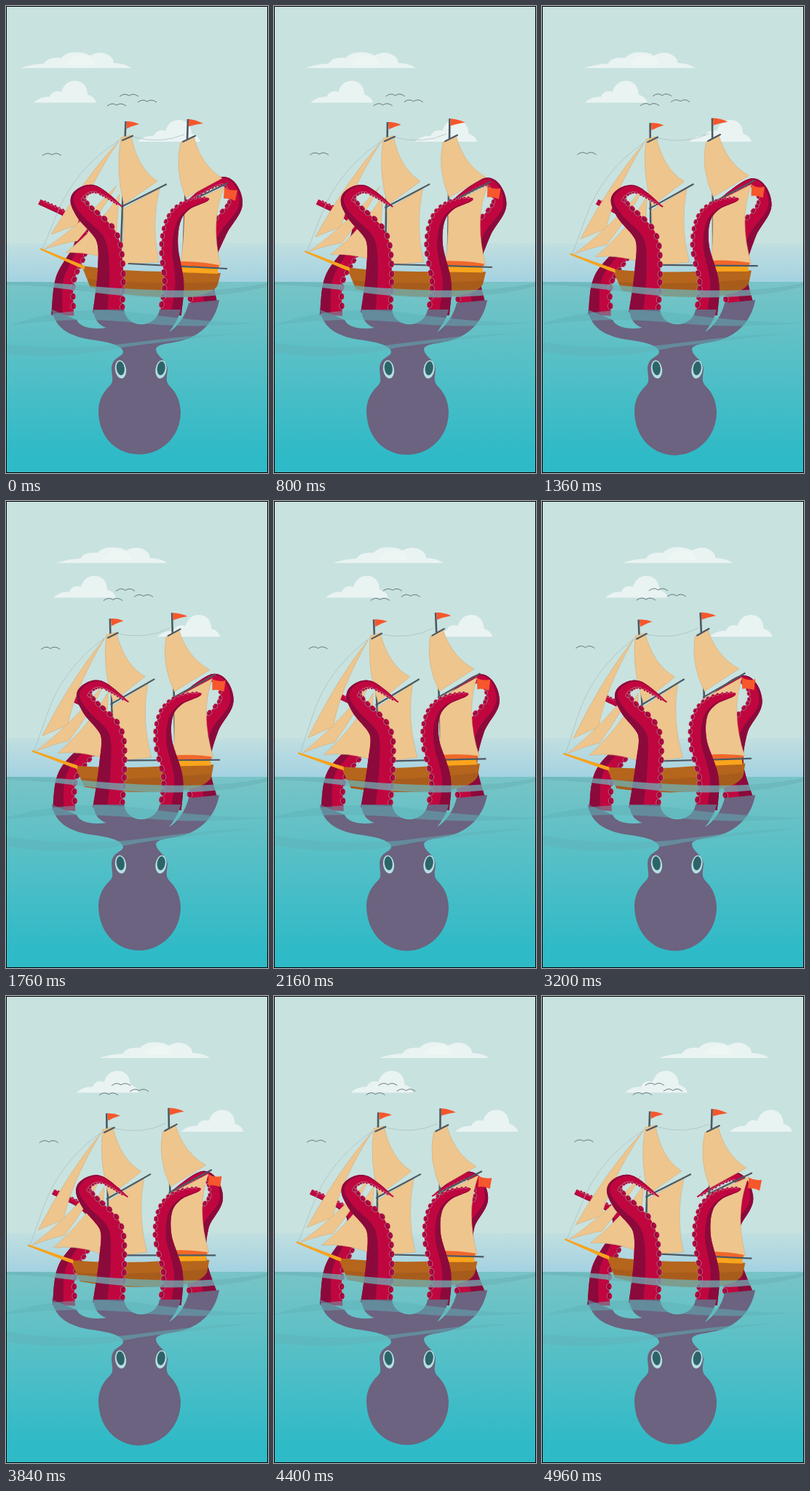
Animation of 360 by 640 pixels, one loop 5.04 s. Source, as an HTML page:

```html
<!DOCTYPE html>
<html lang="en">
<head>
<meta charset="utf-8">
<title>Octopus and ship</title>
<style>
html, body { margin: 0; width: 100%; height: 100%; overflow: hidden; background: #c8e2df; }
svg { display: block; width: 360px; height: 640px; }
</style>
</head>
<body>
<svg viewBox="0 0 360 640" width="360" height="640">
  <defs>
    <linearGradient id="haze" x1="0" y1="0" x2="0" y2="1">
      <stop offset="0" stop-color="#c1dfe0"/><stop offset="1" stop-color="#a2d1e1"/>
    </linearGradient>
    <linearGradient id="sea" x1="0" y1="0" x2="0" y2="1">
      <stop offset="0" stop-color="#78c4c6"/><stop offset=".9" stop-color="#2fbac7"/>
    </linearGradient>
    <path id="puff" d="M0,30 Q9,21 22,22 Q26,12 38,15 Q43,0 57,0 Q73,1 74,19 Q84,22 86,30Z"/>
    <path id="bird" d="M-13,2 Q-6,-3.5 0,1 Q6,-3.5 13,2"/>
    <g id="eye">
      <ellipse rx="7.5" ry="12.5" fill="#b5dfe2"/>
      <ellipse cy="-1.5" rx="5.5" ry="9.5" fill="#2c646a"/>
    </g>
  </defs>

  <rect width="360" height="640" fill="#c8e2df"/>
  <rect y="325" width="360" height="56" fill="url(#haze)"/>

  <g fill="#e9f3f2">
    <g id="cloudA">
      <path d="M20,85 Q38,79 52,79 Q58,69 76,71 Q84,62 100,63.5 Q111,64 115,68 Q130,60 142,68 Q148,72 148,78 Q165,79 172,85Z"/>
      <path d="M82,81 Q92,63 114,69 Q120,72 122,81Z" fill="#f2f8f7" opacity=".6"/>
    </g>
    <use id="cloudB" href="#puff"/>
    <use id="cloudC" href="#puff"/>
  </g>
  <g fill="none" stroke="#5d6d70" stroke-width=".9">
    <g id="flock">
      <use href="#bird" x="169" y="122"/><use href="#bird" x="152" y="135"/><use href="#bird" x="194" y="130"/>
    </g>
    <use id="loner" href="#bird" x="63" y="203"/>
  </g>

  <rect y="378" width="360" height="262" fill="url(#sea)"/>
  <g id="backArms"></g>

  <g id="ship">
    <g fill="none" stroke="#aabcbd" stroke-width=".7">
      <path d="M157,183 Q95,222 70,285 L50,333"/>
      <path d="M173,179 Q212,190 245,176"/>
    </g>
    <path d="M164.5,158 L157,355 M250,155 L243,355" stroke="#4c5963" stroke-width="2.6"/>
    <g fill="#eec58d" stroke="#cfa877" stroke-width=".5">
      <path d="M155,185 Q108,235 62,313 L98,300 Q111,250 155,185Z"/>
      <path d="M53,333 Q102,300 152,246 Q130,285 98,322 Q78,325 53,333Z"/>
      <path d="M82,338 Q128,302 156,258 Q150,310 152,352 Q118,336 82,338Z"/>
      <path d="M158,180 L172,177 Q180,222 208,240 L162,272 Q150,225 158,180Z"/>
      <path d="M161,278 L211,250 Q199,300 210,351 L158,354 Q163,312 161,278Z"/>
      <path d="M240,187 L258,178 Q267,217 297,236 L247,263 Q231,225 240,187Z"/>
      <path d="M245,273 L300,248 Q280,295 295,356 L240,354 Q246,310 245,273Z"/>
    </g>
    <path d="M160,184 L174,178 M243,186 L260,178 M159,275 L220,244.5 M245,271 L304,243" stroke="#4c5963" stroke-width="2.2" stroke-linecap="round"/>
    <g fill="#f6572c">
      <path d="M165.5,158 Q175,158 183,162 Q174,164 166,168Z"/>
      <path d="M251,155 Q262,156 271,161 Q261,162 251,165Z"/>
      <path d="M300,249 Q309,254 318,252 L315,267 Q307,263 299,264Z"/>
    </g>
    <path d="M104,356 Q165,365 238,364 L295,366 L291,382 Q280,399 235,399 Q170,399 116,386Z" fill="#b5651c"/>
    <path d="M112,374 Q190,382 291,378 L290,384 Q280,399 235,399 Q170,399 116,386Z" fill="#a85c1c"/>
    <path d="M238,355 L291,358 L291,367 L238,365Z" fill="#fba41c"/>
    <path d="M240,350 Q268,350 293,355 L292,359 L239,356Z" fill="#f1672a"/>
    <path d="M168,353 L304,360" stroke="#4c5963" stroke-width="2.2"/>
    <path d="M47,331.5 L108,356 L108,361 L100,358 L47,334Z" fill="#f6a31f"/>
  </g>

  <g id="frontArms"></g>
  <path id="body" fill="#6b637f"/>
  <use href="#eye" transform="translate(157.5 498) rotate(-8)"/>
  <use href="#eye" transform="translate(213 498) rotate(8)"/>

  <path d="M0,378 C60,377 100,383 160,387 C240,392 310,391 360,379 L360,384 C310,398 240,403 160,397 C100,391 60,383 0,382Z" fill="#6cb6ba" opacity=".72"/>
  <g fill="#5fb3b9" opacity=".5">
    <path id="waveB" d="M5,438 C70,414 130,414 180,420 C240,430 300,434 345,434 C290,440 230,440 180,434 C120,428 70,429 5,438Z"/>
    <path id="waveC" d="M-60,452 C20,472 110,470 160,463 C210,457 260,450 315,449 C260,456 200,462 160,468 C110,479 30,488 -60,466Z"/>
  </g>
  <rect x=".5" y=".5" width="359" height="639" fill="none" stroke="#000"/>
</svg>

<script>
const LOOP = 5040, STEP = 80;
const RED = "#c0063f", DARK = "#8b0a3b";
const el = id => document.getElementById(id);
const clamp = (v, lo = 0, hi = 1) => Math.max(lo, Math.min(hi, v));
const smooth = v => { v = clamp(v); return v * v * (3 - 2 * v); };

// the ship rocks slowly over, then steadily back
const PEAK = 2.72;
const sway = t => 1.03 * (t < PEAK ? (t / PEAK) ** 1.25 : (5.04 - t) / (5.04 - PEAK));
const reach = t => 45 * Math.max(0, Math.sin(Math.PI * t / 4.8)) ** 1.8;
const lean = t => -13 * Math.sin(Math.PI * t / 5.8);

// path: key points from root to tip; side: where the suckers sit
const arms = {
  backLeft: { side: 1, root: 17, taper: .75, tip: 4, path: [[79, 424], [82, 375], [103, 330], [98, 296], [46, 268]] },
  frontLeft: { side: 1, root: 22, taper: .8, tip: 1, path: [[141, 422], [145, 362], [139, 316], [108, 282], [99, 262], [122, 251], [160, 275]] },
  frontRight: { side: -1, root: 16, taper: .5, tip: 1, path: [[225, 422], [230, 380], [224, 330], [230, 293], [248, 273], [279, 264]] },
  backRight: { side: -1, root: 20, taper: .75, tip: 1, path: [[271, 412], [267, 360], [290, 308], [315, 270], [298, 240], [248, 268]] }
};

// Catmull-Rom spline through the key points
function spline(pts) {
  const n = pts.length - 1, total = n * 12;
  return Array.from({ length: total + 1 }, (_, s) => {
    const i = Math.min(n - 1, Math.floor(s / 12)), u = s / 12 - i;
    const [a, b, c, d] = [-1, 0, 1, 2].map(k => pts[clamp(i + k, 0, n)]);
    return [0, 1].map(k => b[k] + .5 * u * (c[k] - a[k] + u * (2 * a[k] - 5 * b[k] + 4 * c[k] - d[k] + u * (3 * (b[k] - c[k]) + d[k] - a[k]))));
  });
}

const poly = (pts, fill) =>
  `<path d="M${pts.map(p => p.map(v => v.toFixed(1))).join("L")}Z" fill="${fill}"/>`;

function drawArm({ path, side, root, taper, tip }, move) {
  const line = spline(path.map(p => move(...p)));
  const last = line.length - 1;
  const width = line.map((_, i) => Math.max(tip, root * (1 - i / last) ** taper));
  const angle = line.map((_, i) => {
    const a = line[Math.max(0, i - 1)], b = line[Math.min(last, i + 1)];
    return Math.atan2(b[1] - a[1], b[0] - a[0]);
  });
  // point across the arm: k = 1 on the sucker edge, -1 on the back
  const at = (i, k) => {
    const off = width[i] * k * side;
    return [line[i][0] - Math.sin(angle[i]) * off, line[i][1] + Math.cos(angle[i]) * off];
  };
  const edge = k => line.map((_, i) => at(i, k(i / last)));
  const back = edge(() => -1);
  let svg = poly([...back, ...edge(() => .85).reverse()], RED) +
    poly([...back, ...edge(u => -.1 - .7 * smooth(u)).reverse()], DARK);

  let gap = 0;
  for (let i = 1; i < last - 1; i++) {
    gap += Math.hypot(line[i][0] - line[i - 1][0], line[i][1] - line[i - 1][1]);
    const r = clamp(width[i] * .3, 1.6, 4.2);
    if (gap < r * 2.4) continue;
    gap = 0;
    const [x, y] = at(i, .85);
    svg += `<g transform="translate(${x.toFixed(1)} ${y.toFixed(1)}) rotate(${(angle[i] * 180 / Math.PI).toFixed(1)})">` +
      `<ellipse rx="${r * 1.1}" ry="${r * .85}" fill="${DARK}" stroke="#e3a9ae" stroke-width=".5"/>` +
      `<ellipse cy="${side * r * .2}" rx="${r * .65}" ry="${r * .4}" fill="${RED}"/></g>`;
  }
  return svg;
}

const bodyPath = bottom => `M63,416 C67,440 85,452 115,457 C140,460 160,465 161,474 C160,482 146,480 145,497
  C146,512 148,514 143,520 C130,532 127,545 127,556 C128,595 155,${bottom} 183,${bottom} C212,${bottom} 240,592 240,556
  C239,540 234,530 224,520 C219,514 221,508 222,498 C221,483 207,482 206,470 C208,463 222,463 240,459
  C270,452 288,430 293,403 L251,407 C247,425 235,440 224,447 C229,440 237,430 240,416 L211,416
  C207,442 166,444 162,416 L120,416 C121,430 128,438 138,441 C118,444 101,440 97,430Z`;

const place = (id, x, y = 0, more = "") =>
  el(id).setAttribute("transform", `translate(${x.toFixed(2)} ${y.toFixed(2)}) ${more}`);

function render(ms) {
  const t = ms / 1000, r = sway(t), pull = reach(t), tilt = lean(t);
  place("cloudA", 28.2 * t);
  place("cloudB", 38 + 15.3 * t, 102.5);
  place("cloudC", 181 + 15.5 * t, 156);
  place("flock", -2.85 * t, -.3 * t);
  place("loner", -1.1 * t, -t);
  place("waveB", -32 * r, 0, `scale(${1 + .18 * r} 1)`);
  place("waveC", 42 * r);
  place("ship", -3.1 * t, 0, `rotate(${-5.6 * r} 212 435)`);

  // arms bend more the higher they rise above the water
  const rise = (y, span) => smooth((405 - y) / span);
  el("backArms").innerHTML =
    drawArm(arms.backLeft, (x, y) => [x + 3 * r + pull * rise(y, 135) ** 1.4, y]) +
    drawArm(arms.backRight, (x, y) => [x - 7 * t * rise(y, 120), y + 1.5 * t * rise(y, 120)]);
  el("frontArms").innerHTML =
    drawArm(arms.frontLeft, (x, y) => [x + 14 * r * rise(y, 135), y + r * rise(y, 135)]) +
    drawArm(arms.frontRight, (x, y) => [x + tilt * rise(y, 110), y]);
  el("body").setAttribute("d", bodyPath(614.5 + 2.6 * r));
}

const start = performance.now();
function tick() {
  const now = (performance.now() - start) % LOOP;
  render(Math.floor(now / STEP) * STEP);
  requestAnimationFrame(tick);
}
tick();
</script>
</body>
</html>
```
